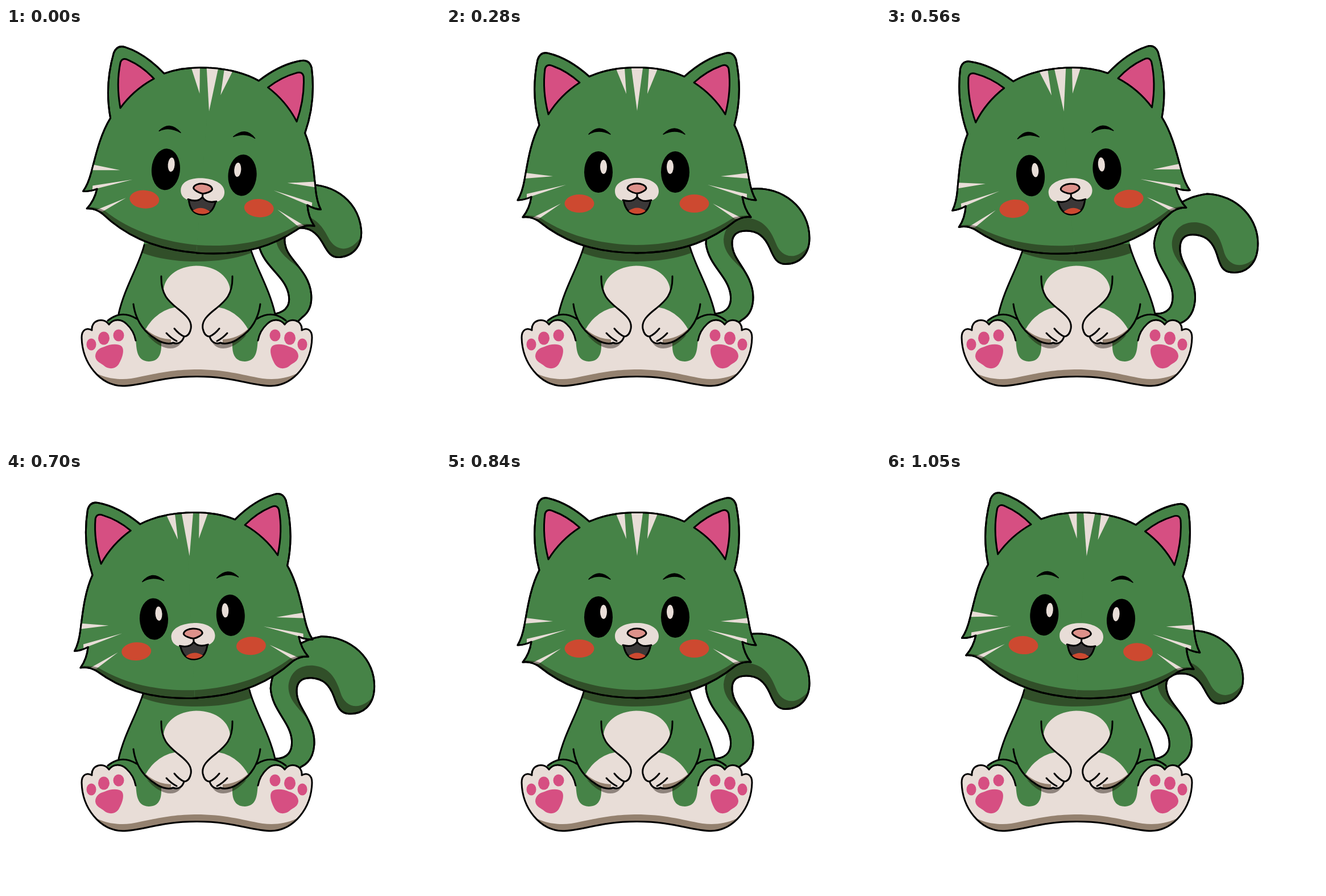
Animation of 763 by 734 pixels, one loop 1120 ms. Source, as an HTML page:

```html
<!DOCTYPE html>
<html lang="en">
<head>
<meta charset="utf-8">
<title>Green kitten</title>
<style>
html, body { margin: 0; height: 100%; overflow: hidden; background: #fff; }
svg { display: block; width: 100%; height: 100%; }
.green { fill: #468347; }
.cream { fill: #e8ddd7; }
.pink { fill: #d64f82; }
.red { fill: #cd4930; }
.tan { fill: #94816f; }
.shade { fill: rgba(20, 8, 0, .42); }
.ink { stroke: #000; stroke-width: 3; stroke-linecap: round; stroke-linejoin: round; }
.line { fill: none; }
</style>
</head>
<body>
<svg viewBox="0 0 763 734">
  <defs>
    <path id="tailShape" d="M500 530L520 514C534 506 540 492 540 474C540 435 508 412 504 388C500 368 508 357 528 357C548 357 560 367 569 387C577 406 582 415.500 597 415.500C622 415.500 639 398 639 370C639 315 590 279 540 283C490 295 457 335 457 380C462 418 495 436 500 468C503 488 495 501 474 503L480 530"/>
    <path id="headShape" d="M338 69.500Q288 69 252 85.500Q216 53 180 44.500Q166 41 161 56Q149 115 164 171C148 202 143 240 138 267Q134 290 126 303Q138 303 150 297Q147 318 135 333Q150 331 163 340C200 370 250 396 338 396"/>
    <path id="armShape" d="M273 437C272 470 286 481 302 494C320 508 327 517 325 529C323 539 318 543 313 543C310 554 301 557 294 554C284 558 270 553 260 545C239 532 227 510 224 486"/>
    <clipPath id="tailClip"><use href="#tailShape"/></clipPath>
    <clipPath id="headClip"><use href="#headShape"/></clipPath>
    <clipPath id="armClip"><use href="#armShape"/></clipPath>
    <path id="foot" d="M338 613.500C270 613 240 630 205 630C165 629 134 590 133 545C133 530 143 527 151 532C149 514 172 508 181 522C190 510 204 513 212 521Q225 533 228 550"/>
    <clipPath id="footClip"><path d="M338 613C270 613 240 630 205 630C165 629 134 590 133 545V500H338"/></clipPath>

    <g id="torso">
      <path class="green" d="M338 560H230L198 503C206 465 236 420 243 375H338"/>
      <path class="ink line" d="M243 382C234 418 209 455 198 503"/>
      <path class="shade" d="M243 380H338V411Q280 411 240 396"/>
      <path class="cream" d="M338 418.500C300 418 277 440 277 463Q280 510 260 545L270 575H338"/>
    </g>

    <g id="limbs">
      <path class="cream" d="M338 540H250L228 550L205 560L205 630C240 630 270 613 338 613"/>
      <use href="#foot" class="cream"/>
      <path class="green" d="M178 516Q203 495 230 512L273 548V562Q272 587 251 587C228 586 230 562 228 550Q222 530 212 521Q195 509 182 521"/>
      <path class="tan" clip-path="url(#footClip)" d="M140 595C165 617 195 620 220 617C260 610 285 601 338 601V640H140"/>
      <use href="#foot" class="ink line"/>
      <path class="ink line" d="M179 515Q203 495 230 512"/>
      <path class="pink" d="M173 561C183 556 197 555 203 560C210 567 203 584 198 592C191 602 179 600 173 595C168 590 158 588 157 578C157 568 165 563 173 561"/>
      <g class="pink">
        <ellipse cx="150" cy="557" rx="8.500" ry="10.500"/>
        <ellipse cx="172" cy="546" rx="10" ry="11.500"/>
        <ellipse cx="198" cy="541" rx="9.500" ry="10.500"/>
      </g>
      <path class="shade" d="M248 540Q275 553 313 543Q307 564 289 564Q268 563 248 540"/>
      <path class="green" d="M273 437C272 470 286 481 302 494L262 546C240 532 226 510 224 486"/>
      <g clip-path="url(#armClip)">
        <path class="cream" d="M245 531Q264 497 300 491L340 510L320 560H260"/>
        <path class="tan" d="M246 530Q264 547 290 548L290 562H250"/>
      </g>
      <use href="#armShape" class="ink line"/>
      <path class="ink line" d="M296 529Q304 539 313 543M282 537Q290 546 300 551"/>
    </g>

    <g id="face">
      <use href="#headShape" class="green ink"/>
      <g clip-path="url(#headClip)">
        <path class="cream" d="M140 255L188 261L138 265ZM142 292L211 276L142 299ZM150 335L202 309L163 336Z"/>
        <path class="cream" d="M299 72L314 70L317 116Z"/>
        <path class="shade" d="M130 331Q150 328 166 334C205 361 265 382 338 382V400H130"/>
      </g>
      <use href="#headShape" class="ink line"/>
      <path class="pink ink" d="M180 152Q169 110 174 72Q177 62 188 67Q213 76 235 96Q201 118 180 152Z"/>
      <path d="M251 187Q269 167 289 187Q268 177 251 187Z" stroke="#000" stroke-width="1.500" stroke-linejoin="round"/>
      <ellipse cx="268" cy="253.500" rx="25" ry="36.500"/>
      <ellipse class="cream" cx="277" cy="244.500" rx="6" ry="12.500"/>
      <ellipse class="red" cx="234.500" cy="309" rx="26" ry="16"/>
    </g>
  </defs>

  <g id="tail">
    <use href="#tailShape" class="green ink"/>
    <path class="shade" clip-path="url(#tailClip)" d="M545 450C515 415 488 402 488 372C490 346 508 335 530 335C556 336 570 353 580 379C590 406 618 411 640 380V425H570L530 365Z"/>
    <use href="#tailShape" class="ink line"/>
  </g>

  <use href="#torso"/>
  <use href="#torso" transform="translate(671) scale(-1 1)"/>
  <use href="#limbs"/>
  <use href="#limbs" transform="translate(671) scale(-1 1)"/>

  <g id="head">
    <use href="#face"/>
    <use href="#face" transform="translate(671) scale(-1 1)"/>
    <path class="cream" d="M326 71H346L336 146Z"/>
    <path class="ink" fill="#3b3838" d="M312 302Q316 328 336 328Q356 328 360 302Q345 307 336 297Q326 307 312 302Z"/>
    <path class="red" d="M321 322Q336 311 351 322Q345 327 336 327Q327 327 321 322Z"/>
    <path class="cream" d="M336 264C315 264 297 272 297 287C297 299 307 305 318 305Q330 304 336 297Q342 304 353 305C364 305 374 299 374 287C374 272 356 264 336 264Z"/>
    <path class="ink line" d="M311 303Q329 308 336 297Q343 308 361 303M336 290V297"/>
    <path class="ink" fill="#dd918a" d="M319 282C321 271 350 271 352 282C352 286 341 291 336 291C331 291 319 286 319 282Z"/>
  </g>
</svg>
<script>
const STEP = 70, COUNT = 16;
// Head tilt in degrees from one end of the swing to the other.
const tilts = [4.4, 3.5, 2.4, 1.2, 0, -1.4, -2.8, -3.9, -4.9];
const head = document.getElementById('head');
const tail = document.getElementById('tail');
const start = performance.now();

function turn(part, angle, x, y) {
  part.setAttribute('transform', `rotate(${angle} ${x} ${y})`);
}

function draw() {
  const step = Math.floor((performance.now() - start) / STEP) % COUNT;
  const tilt = tilts[Math.min(step, COUNT - step)];
  turn(head, tilt, 335.5, 420);
  turn(tail, -1.33 * tilt, 474, 505);
  requestAnimationFrame(draw);
}
draw();
</script>
</body>
</html>
```
